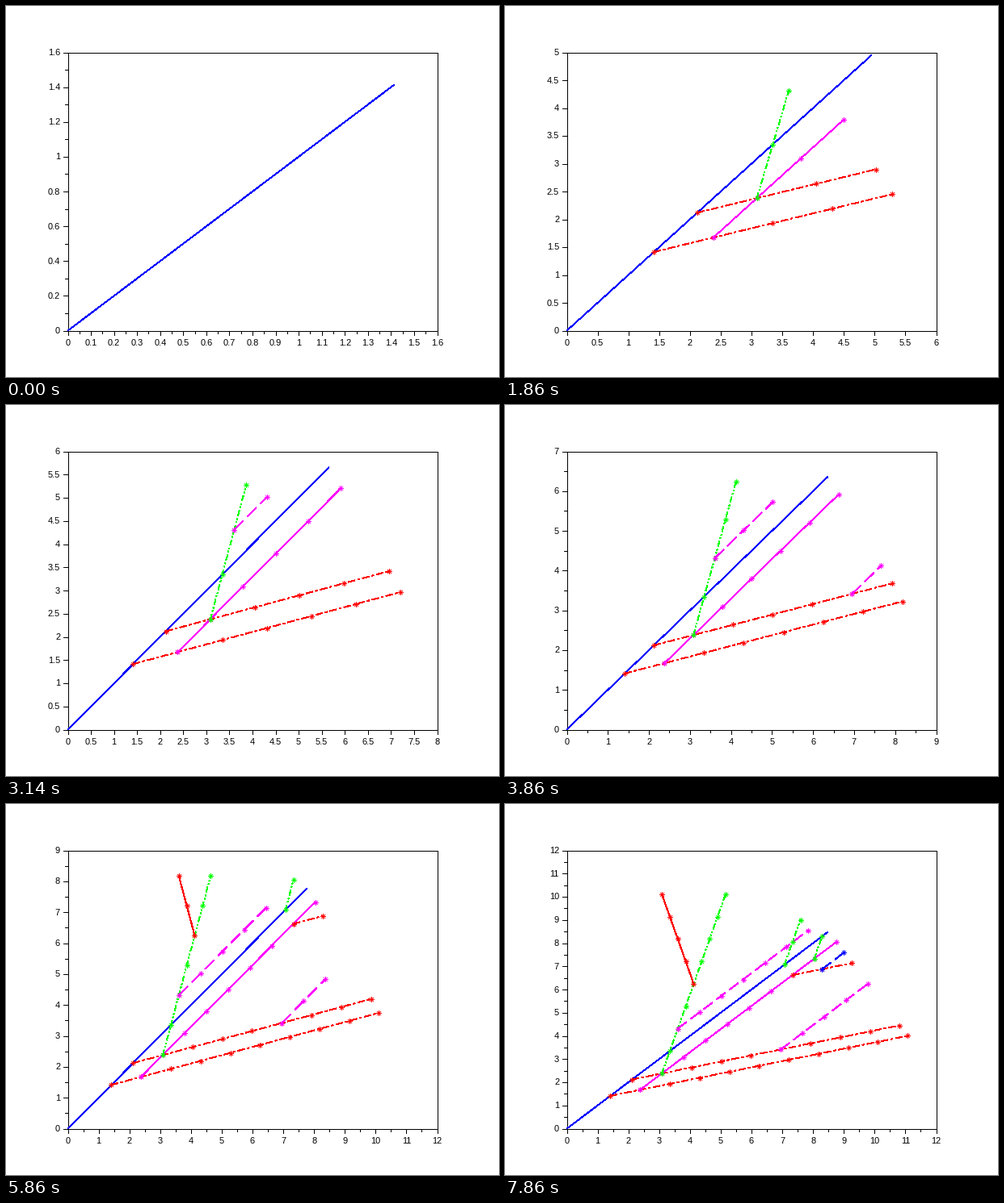
Write a matplotlib script that moves like this. It is 610x460 px and loops after 8000 ms.

```python
import math

import matplotlib.pyplot as plt
import numpy as np
from matplotlib.animation import FuncAnimation
from matplotlib.path import Path

W, H, DPI = 610, 460, 80
PT = 72 / DPI
LEFT, RIGHT, TOP, BOTTOM = 76.5, 533.5, 57.5, 402.5
FRAMES, LOOP = 56, 8000

RED, GREEN, BLUE, MAGENTA = "#ff0000", "#00ff00", "#0000ff", "#ff00ff"
SOLID = None
DASH = (11, 5)
DASH_DOT = (8, 3, 2, 3)
DASH_DOTS = (6, 3, 1, 2, 1, 3)

# parent, parent length at birth, angle, colour, dash pattern
BRANCHES = [
    (None, 0, 45, BLUE, SOLID),
    (0, 3, 15, RED, DASH_DOT),
    (0, 4, 15, RED, DASH_DOT),
    (1, 2, 45, MAGENTA, SOLID),
    (3, 2, 75, GREEN, DASH_DOTS),
    (4, 3, 45, MAGENTA, DASH),
    (2, 6, 45, MAGENTA, DASH),
    (4, 5, 105, RED, SOLID),
    (0, 11, 75, GREEN, DASH_DOTS),
    (3, 8, 15, RED, DASH_DOT),
    (3, 9, 75, GREEN, DASH_DOTS),
    (9, 2, 45, BLUE, DASH),
]


def grow():
    """Branch lengths per frame: one branch grows each step, in rounds."""
    births = {b[:2] for b in BRANCHES[1:]}
    lengths = [2]
    states = [tuple(lengths)]
    while len(states) < FRAMES:
        for i in range(len(lengths)):
            lengths[i] += 1
            if (i, lengths[i]) in births:
                lengths.append(1)
            states.append(tuple(lengths))
    return states[:FRAMES]


def direction(angle):
    a = math.radians(angle)
    return np.array([math.cos(a), math.sin(a)])


def find_starts():
    starts = [np.zeros(2)]
    for parent, length, *_ in BRANCHES[1:]:
        step = direction(BRANCHES[parent][2])
        starts.append(starts[parent] + (length - 1) * step)
    return starts


STATES = grow()
STARTS = find_starts()

STAR = Path(
    [(-1, 0), (1, 0), (0, -1), (0, 1),
     (-.7, -.7), (.7, .7), (-.7, .7), (.7, -.7)],
    [Path.MOVETO, Path.LINETO] * 4)

plt.rcParams["lines.scale_dashes"] = False
plt.rcParams["font.family"] = "Liberation Sans"
fig = plt.figure(figsize=(W / DPI, H / DPI), dpi=DPI, facecolor="white")
ax = fig.add_axes([0, 0, 1, 1])


def scale(top, size):
    """Upper limit, label step and minor step for an axis of size pixels."""
    mag = 10 ** math.floor(math.log10(top))
    lead = next(m for m in (2, 5, 10) if top <= m * mag)
    step = lead * mag / 10
    limit = math.ceil(top / step - 1e-9) * step
    px = size / limit
    parts = 5 if lead == 5 else 2
    if lead != 5 and step / 2 * px >= 28:
        step /= 2
        parts = 5 if lead == 10 else 2
    minor = step / parts
    return limit, step, minor if minor * px >= 8 else step


def stroke(x, y):
    ax.plot(x, y, color="black", lw=PT, aa=False, solid_capstyle="butt")


def label(x, y, value, ha):
    ax.text(x, y, f"{value:.4g}", ha=ha, va="baseline", fontsize=11 * PT)


def ticks(limit, step, minor, horizontal):
    for k in range(round(limit / minor) + 1):
        part = k * minor / limit
        value = k * minor
        major = abs(value / step - round(value / step)) < 1e-6
        size = 5.5 if major else 3.5
        if horizontal:
            x = LEFT + part * (RIGHT - LEFT)
            stroke([x, x], [BOTTOM, BOTTOM + size])
            if major:
                label(x, 421, value, "center")
        else:
            y = BOTTOM - part * (BOTTOM - TOP)
            stroke([LEFT - size, LEFT], [y, y])
            if major:
                label(67, y + 3.5, value, "right")


def draw_branch(index, pts):
    _, _, _, color, dash = BRANCHES[index]
    dx, dy = np.abs(pts[-1] - pts[0])
    slant = math.hypot(dx, dy) / max(dx, dy)
    style = "-"
    if dash:
        style = (0, [d * slant * PT for d in dash])
    ax.plot(*pts.T[:, [0, -1]], color=color, lw=1.1 * PT / slant, ls=style,
            aa=False, solid_capstyle="butt", dash_capstyle="butt")
    if index:
        ax.plot(*pts.T, ls="none", marker=STAR, ms=7 * PT, mew=PT,
                mec=color, mfc="none", aa=False)


def draw(frame):
    ax.clear()
    ax.set_axis_off()
    ax.set_xlim(0, W)
    ax.set_ylim(H, 0)

    lines = []
    for i, n in enumerate(STATES[frame]):
        steps = np.arange(n + 1)[:, None]
        lines.append(STARTS[i] + steps * direction(BRANCHES[i][2]))
    x_top, y_top = np.vstack(lines).max(axis=0)
    x_scale = scale(x_top, RIGHT - LEFT)
    y_scale = scale(y_top, BOTTOM - TOP)

    stroke([LEFT, RIGHT, RIGHT, LEFT, LEFT], [TOP, TOP, BOTTOM, BOTTOM, TOP])
    ticks(*x_scale, True)
    ticks(*y_scale, False)
    for i, pts in enumerate(lines):
        x = LEFT + pts[:, 0] / x_scale[0] * (RIGHT - LEFT)
        y = BOTTOM - pts[:, 1] / y_scale[0] * (BOTTOM - TOP)
        draw_branch(i, np.column_stack([x, y]))
    return []


anim = FuncAnimation(fig, draw, frames=FRAMES, interval=LOOP / FRAMES,
                     init_func=lambda: [], repeat=True, repeat_delay=0)
plt.show()
```
